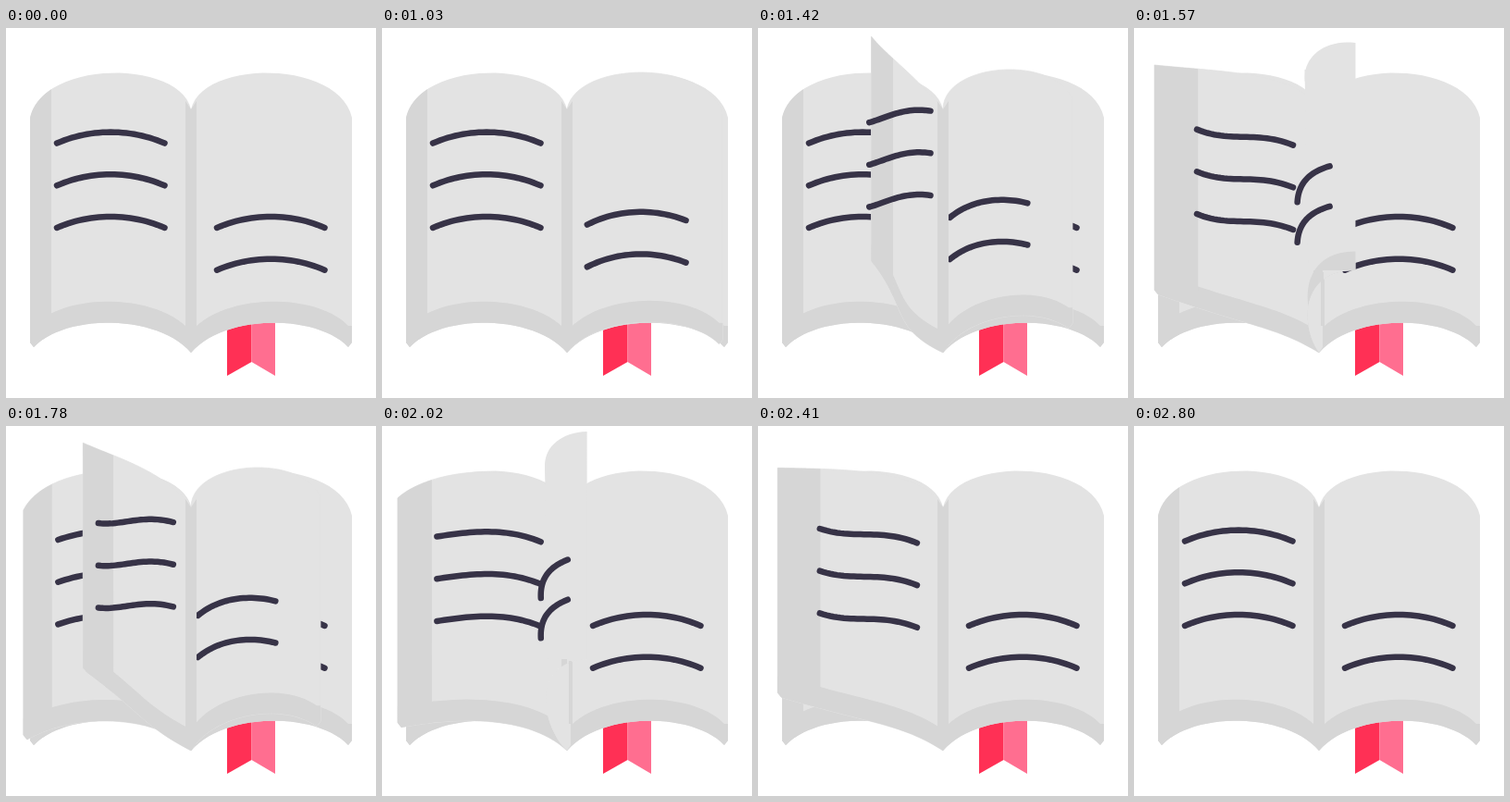
An HTML page for the animation above (2830 ms loop, 400 px wide and 400 px high).

```html
<!DOCTYPE html>
<html lang="en">
<head>
<meta charset="utf-8">
<title>Book with turning pages</title>
<style>
html, body { margin: 0; width: 100%; height: 100%; overflow: hidden; background: #fff; }
svg { display: block; width: 100vw; height: 100vh; }
</style>
</head>
<body>
<svg id="stage" viewBox="0 0 400 400"></svg>
<script>
const LOOP = 2830, STEP = 30, PAUSE = 1030;
const RISE = 270, SWING = 300, SETTLE = 310;
const LIGHT = '#e3e3e3', DARK = '#d6d6d6', INK = '#373347';
const FLIPS = [{ start: 1000, pace: 1 }, { start: 1320, pace: 1 }, { start: 1650, pace: 1.3 }];
const stage = document.getElementById('stage');

// Each key shape is two cubics: the top edge from the spine out, and one line of text.
const mirror = ([x, y]) => [400 - x, y];
const right = {
  top: [[200, 88], [212, 34], [360, 34], [374, 97]],
  text: [[228, 216], [265, 200], [308, 200], [344.5, 216]]
};
const upright = {
  top: [[200, 88], [160, 52], [172, 8], [223, 6]],
  text: [[172.5, 186], [171, 162], [184, 151], [201, 144]]
};
const landing = {
  top: [[200, 88], [178, 48], [102, 48], [22, 40]],
  text: [[68, 201], [104, 216], [132, 202], [172, 218]]
};
const left = {
  top: right.top.map(mirror),
  text: right.text.map(([x, y]) => [400 - x, y])
    .map(([x, y]) => [x - .5, y]).reverse()
};
// The left text block sits level with the right one, centred on its own page.

const mix = (a, b, k) => a + (b - a) * k;
const blend = (from, to, k) => from.map((p, i) => p.map((v, j) => mix(v, to[i][j], k)));
const smooth = k => k * k * (3 - 2 * k);

function point([a, b, c, d], t) {
  const u = 1 - t;
  return [0, 1].map(i =>
    u * u * u * a[i] + 3 * u * u * t * b[i] + 3 * u * t * t * c[i] + t * t * t * d[i]);
}
const sample = (curve, from = 0, steps = 28) =>
  Array.from({ length: steps + 1 }, (_, i) => point(curve, mix(from, 1, i / steps)));
const shift = (curve, dy) => curve.map(([x, y]) => [x, y + dy]);
const trace = points => 'M' + points.map(p => p.map(v => v.toFixed(2)).join(' ')).join('L');
const fill = (points, color, extra = '') => `<path d="${trace(points)}Z" fill="${color}" ${extra}/>`;

// Part of a curve that lies left of x, up to its outer end.
function beyond(curve, x) {
  let t = 1;
  while (t > 0 && point(curve, t)[0] < x) t -= .002;
  return sample(curve, t);
}

function shapeAt(time) {
  if (time <= RISE) {
    const k = time / RISE, lift = k ** 1.5;
    return { top: blend(right.top, upright.top, lift),
      text: blend(right.text, upright.text, k), lift, margin: 0, band: true };
  }
  if (time <= RISE + SWING) {
    const e = smooth((time - RISE) / SWING);
    const top = blend(upright.top, landing.top, e);
    top[3][1] -= 14 * Math.sin(Math.PI * e);
    return { top, text: blend(upright.text, landing.text, e), lift: 1, margin: 47 * e, band: false };
  }
  const k = (time - RISE - SWING) / SETTLE, e = 1 - (1 - k) ** 2;
  const top = blend(landing.top, left.top, e);
  top[3][0] -= 8 * Math.sin(Math.PI * k);
  return { top, text: blend(landing.text, left.text, e), lift: 0, margin: mix(47, 23, k), band: true };
}

function makePage(shape) {
  const [spine, a, b, outer] = shape.top;
  const back = outer[0] < 175;
  const raised = !back && outer[0] < 260;
  const lift = back ? 0 : shape.lift;
  const side = back ? -1 : 1;
  const pull = side * (24 - 10 * lift);
  const corner = raised ? 0 : 4 * side;
  const low = [
    [200, 351],
    [a[0] + pull, a[1] + 275],
    [b[0] - pull, b[1] + 275 - 27 * lift],
    [outer[0] - corner, outer[1] + (raised ? 246 : 248)]
  ];
  return { ...shape, outer, low, back, raised, lift, band: shape.band || back };
}

function drawText({ text, back, lift }) {
  const gap = 45.7 - 2.5 * lift;
  const rows = back ? [-2, -1, 0] : [0, 1];
  return rows.map(row => `<path d="${trace(sample(shift(text, row * gap)))}" fill="none"
    stroke="${INK}" stroke-width="6.5" stroke-linecap="round"/>`).join('');
}

function drawPage(page, moving) {
  const { top, low, outer, back, raised, lift, margin } = page;
  const [x, y] = outer;
  const foot = [x, y + (raised ? 246 : 243)];
  const bottom = [foot, ...sample(low).reverse()];
  const edge = moving && !raised ? `stroke="${LIGHT}" stroke-width=".8"` : '';
  const upper = sample(top);
  let out = fill([...upper, ...bottom], LIGHT, edge);
  if (raised) {
    const fold = Math.min(...upper.map(p => p[0]));
    out += fill([[fold, 45], [206, 45], [206, y + 246], [fold + 4, y + 246]], LIGHT);
  }
  if (page.band) {
    const rim = sample(shift(low, 3 * lift - 23));
    out += fill([...rim, [x, rim[rim.length - 1][1]], ...bottom], DARK);
  }
  if (raised) {
    out += fill([...sample(low), [204, y + 246], [204, 345]], LIGHT);
    out += `<path d="M203.5 ${y + 248}V322" stroke="${DARK}" stroke-width="3"/>`;
  }
  if (back) {
    const inner = x + margin;
    out += fill([...beyond(top, inner), foot, ...beyond(low, inner).reverse()], DARK);
  }
  return out + drawText(page);
}

const bookmark = '<path d="M239 300H265.500V361L239 376Z" fill="#ff3055"/>' +
  '<path d="M265.500 300H291V376L265.500 361Z" fill="#ff6e90"/>';
const spine = `<path d="M194 79L200 88L206 79V343L200 351L194 343Z" fill="${DARK}"/>`;
const restPages = [RISE + SWING + SETTLE, 0]
  .map(time => drawPage(makePage(shapeAt(time)), false)).join('');

function render(time) {
  const pages = FLIPS
    .map(f => (time - f.start) / f.pace)
    .filter(t => t > 0 && t < RISE + SWING + SETTLE)
    .map(t => makePage(shapeAt(t)));
  const layer = raised => pages.filter(p => p.raised === raised)
    .map(p => drawPage(p, true)).join('');
  stage.innerHTML = bookmark + restPages + layer(false) + spine + layer(true);
}

const begin = performance.now();
function tick() {
  const time = (performance.now() - begin) % LOOP;
  render(time < PAUSE ? 0 : PAUSE + Math.floor((time - PAUSE) / STEP) * STEP);
  requestAnimationFrame(tick);
}
tick();
</script>
</body>
</html>
```
